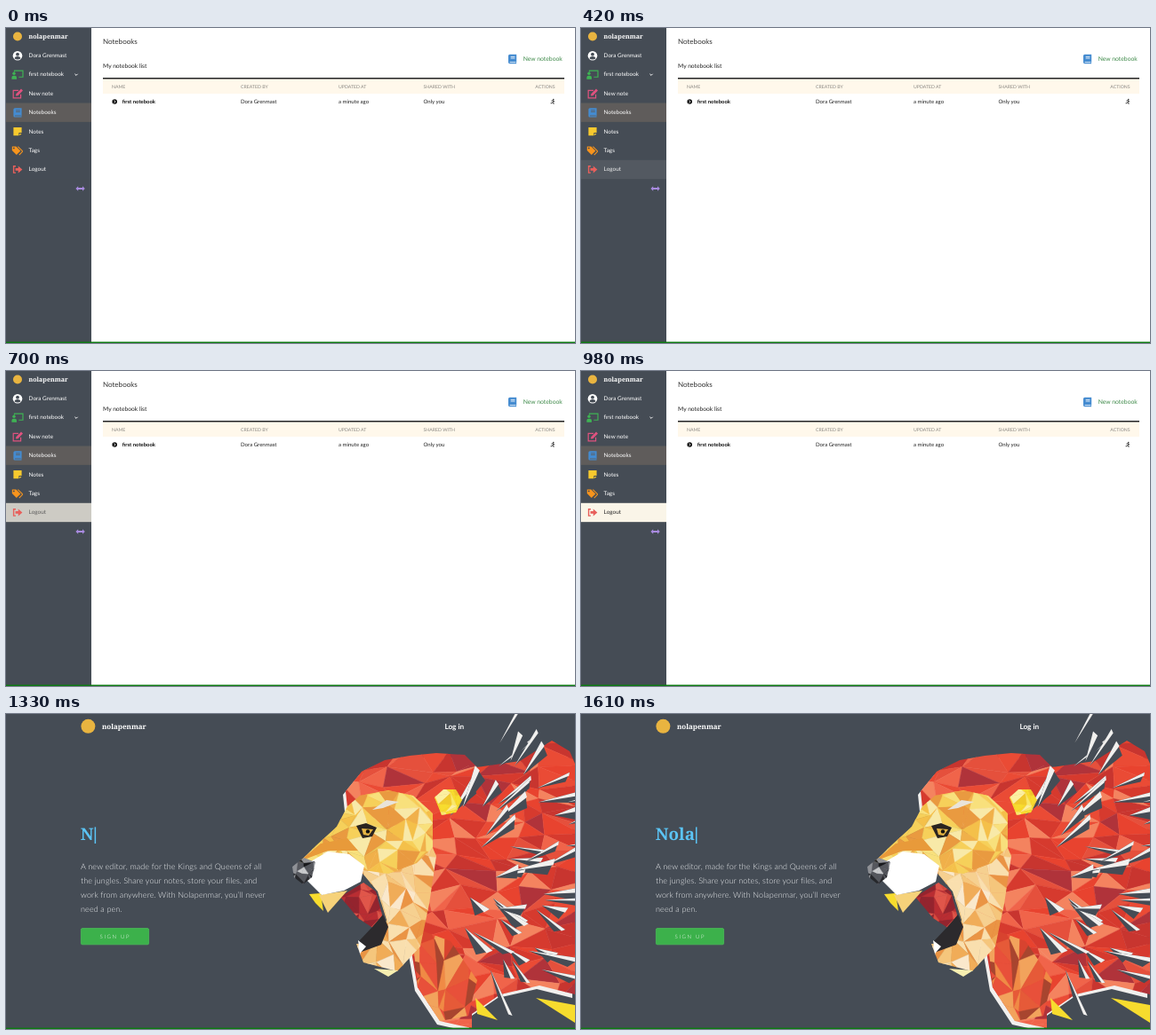
Recreate the animation shown at these times as an HTML page. Size 640x355 px, loop 1.68 s.

```html
<!DOCTYPE html>
<html lang="en">
<head>
<meta charset="utf-8">
<title>Notebooks</title>
<style>
  html, body { margin: 0; width: 100%; height: 100%; overflow: hidden; background: #fff; }
  svg { display: block; width: 640px; height: 355px; }
  text { font-family: Lato, "Open Sans", sans-serif; text-rendering: geometricPrecision; white-space: pre; }
  .slab { font-family: "Noto Serif", serif; }
</style>
</head>
<body>
<svg id="stage" viewBox="0 0 640 355"></svg>
<script>
const LOOP = 1680, TICK = 70, SWAP = 1330;
const SLATE = '#454c55', CREAM = '#fffaec', BLUE = '#448bd0', SKY = '#5bc4f5', GOLD = '#e9b440';
const BRAND = 'nolapenmar', USER = 'Dora Grenmast';
const stage = document.getElementById('stage');

function el(parent, tag, attrs = {}) {
  const node = document.createElementNS('http://www.w3.org/2000/svg', tag);
  for (const key in attrs) node.setAttribute(key, attrs[key]);
  parent.append(node);
  return node;
}
const rect = (p, x, y, width, height, fill, more) => el(p, 'rect', { x, y, width, height, fill, ...more });
const dot = (p, cx, cy, r, fill) => el(p, 'circle', { cx, cy, r, fill });
const shape = (p, points, fill, more) => el(p, 'polygon', { points, fill, ...more });
const solid = (p, d, fill) => el(p, 'path', { d, fill });
const line = (p, d, stroke, width) => el(p, 'path', { d, stroke, fill: 'none', 'stroke-width': width });
const at = (p, x, y) => el(p, 'g', { transform: `translate(${x} ${y})` });
function label(p, x, y, str, size, fill, more) {
  const node = el(p, 'text', { x, y, fill, 'font-size': size, ...more });
  node.textContent = str;
  return node;
}

const app = el(stage, 'g');
const hero = el(stage, 'g');

// ---- Icons, each drawn around its own centre ----
function book(g, paper) {
  solid(g, 'M-3-5.2H4.6V3.2Q4.1 4 4.6 5.2H-3Q-4.6 5.2-4.6 3.6V-3.6Q-4.6-5.2-3-5.2Z', BLUE);
  line(g, 'M-1.9-2.6H2.8M-1.9-.9H2.8M-3 3.6H3.8', paper, .8);
}
const icons = {
  user(g) {
    dot(g, 0, 0, 5.3, '#fff');
    dot(g, 0, -1.6, 1.9, SLATE);
    solid(g, 'M-3.4 3.2Q-3 .8 0 .8Q3 .8 3.4 3.2Q0 5.4-3.4 3.2Z', SLATE);
  },
  teacher(g) {
    line(g, 'M-3.5-3.2V-4.6H6V2.6H1.4', '#3fb354', 1.2);
    dot(g, -4, -1.4, 1.7, '#3fb354');
    solid(g, 'M-6.6 5V3.2Q-6.6 1-4.4 1H-3Q-1 1-1 3.2V5Z', '#3fb354');
  },
  edit(g) {
    line(g, 'M1-3.6H-4.8V4.9H3.6V.8', '#e0527f', 1.2);
    solid(g, 'M-2 2.6L-1.6.2L4-5.4L6-3.4L.4 2.2Z', '#e0527f');
  },
  book(g) { book(g, '#5f5c5b'); },
  sticky(g) { solid(g, 'M-4.6-4.6H4.6V1.4H1.4V4.6H-4.6ZM2.2 4.6V2.2H4.6Z', '#f8c92e'); },
  tags(g) {
    solid(g, 'M-6.2-4.6H-1.6L3.4.4L-1.2 5L-6.2 0Z', '#f7941d');
    line(g, 'M.4-4.4L5.2.4Q5.8 1 5.2 1.6L1.8 5', '#f7941d', 1.1);
    dot(g, -4.2, -2.6, .9, SLATE);
  },
  leave(g) {
    line(g, 'M-2-3.7H-4.4V3.7H-2', '#e8605c', 1.4);
    solid(g, 'M-2.4-1.4H.8V-4L5.4 0L.8 4V1.4H-2.4Z', '#e8605c');
  }
};

// ---- Notebook list ----
const ROW = 21.35;
rect(app, 0, 0, 640, 355, '#fff');
rect(app, 0, 0, 96, 355, SLATE);
rect(app, 0, 84.5, 96, ROW, '#5f5c5b');
const logoutRow = rect(app, 0, 148.8, 96, ROW, SLATE);
dot(app, 13, 9.5, 5, GOLD);
label(app, 25.5, 12, BRAND, 7.1, '#fff', { class: 'slab', 'font-weight': 700 });

const menu = {
  user: USER, teacher: 'first notebook', edit: 'New note', book: 'Notebooks',
  sticky: 'Notes', tags: 'Tags', leave: 'Logout'
};
const menuText = Object.entries(menu).map(([icon, str], i) => {
  const y = 31 + i * ROW;
  icons[icon](at(app, 13, y + .3));
  return label(app, 25.6, y + 2.1, str, 6.4, '#fff');
});
const logoutText = menuText.at(-1);
line(app, 'M77.4 51.8L79 53.4L80.6 51.8', '#fff', 1);
solid(at(app, 83.6, 181), 'M-5.2 0L-2.4-2.8V-.9H2.4V-2.8L5.2 0L2.4 2.8V.9H-2.4V2.8Z', '#a98be0');

label(app, 109, 18, 'Notebooks', 8.05, '#333');
label(app, 109, 44.9, 'My notebook list', 6.7, '#222');
book(at(app, 569.6, 35), '#fff');
label(app, 581.7, 37.3, 'New notebook', 6.8, '#3f8a4a');
rect(app, 109, 57.4, 519, 16.7, '#fff8eb');
rect(app, 109, 56, 519, 1.5, '#222');

function column(x, title, value, anchor = 'start') {
  label(app, x, 67.6, title, 5.2, '#8b8984', { 'text-anchor': anchor });
  label(app, x, 85.1, value, 6.05, '#222');
}
column(119, 'NAME', '');
column(264, 'CREATED BY', USER);
column(374, 'UPDATED AT', 'a minute ago');
column(469.5, 'SHARED WITH', 'Only you');
column(617.6, 'ACTIONS', '', 'end');
dot(app, 122.2, 83, 2.8, '#111');
line(app, 'M121.6 81.5L123.1 83L121.6 84.5', '#fff', .8);
label(app, 130.8, 85.1, 'first notebook', 5.9, '#111', { 'font-weight': 700 });
const runner = at(app, 615, 82.9);
dot(runner, .8, -2.4, .7, '#111');
line(runner, 'M-1.6-.6L-.4-1.3L.8-1L-.2.8L1 1.6V3M-.2.8L-1 1.9H-2.4M.8-1L1.3 0H2.2', '#111', .8);

// ---- Landing page ----
rect(hero, 0, 0, 640, 355, SLATE);
dot(hero, 92.4, 13.8, 8, GOLD);
label(hero, 108, 16.8, BRAND, 8, '#fff', { class: 'slab', 'font-weight': 600 });
label(hero, 493.4, 17, 'Log in', 8.2, '#fff', { 'font-weight': 700 });
const typed = label(hero, 83.8, 142.4, '', 18.8, SKY, { class: 'slab', 'font-weight': 600 });
const caret = rect(hero, 0, 127.4, 1.5, 18.6, SKY);
[
  'A new editor, made for the Kings and Queens of all',
  'the jungles. Share your notes, store your files, and',
  'work from anywhere. With Nolapenmar, you’ll never',
  'need a pen.'
].forEach((str, i) => label(hero, 84, 175.4 + i * 15.95, str, 9, '#eceef0',
  { 'font-weight': 300, 'letter-spacing': .12 }));
rect(hero, 84.4, 241.6, 76.2, 18.2, '#3cb14b', { rx: 1.5, stroke: '#4bbb59', 'stroke-width': .8 });
label(hero, 105.6, 252.9, 'SIGN UP', 6, '#fff', { 'letter-spacing': 1.6, 'font-weight': 300 });

// ---- Low-poly lion ----
const REDS = ['#e8432f', '#ea4b35', '#d63a2e', '#c8352f', '#f0644a', '#b0333a', '#e5503c', '#f4835f'];
const EMBERS = ['#e65a38', '#f08a45', '#d8432f', '#f2a35c', '#a8452f', '#e8503a'];
const GOLDS = ['#f6d05a', '#f8e07c', '#f0b04a', '#f4c04a', '#e99a40', '#f8e9a8'];
const TANS = ['#f5c67c', '#f9dfae', '#f0ac58', '#f6d090', '#fae8cc', '#ea9444'];
const LEMONS = ['#f7dc2e', '#f9e96a', '#f0c92c', '#fbf0a0'];
const CRIMSONS = ['#b92d32', '#d84a3e', '#94242e', '#e0564a'];
const GREYS = ['#26272b', '#55575d', '#8f9196', '#18191c', '#c9cacc'];

function seeded(seed) {
  return () => (seed = (seed * 16807) % 2147483647) / 2147483647;
}
const pick = (list, rnd) => list[Math.floor(rnd() * list.length)];

// Fills an outline with jittered triangles.
let clips = 0;
function facets(outline, w, h, palette) {
  const id = 'clip' + ++clips, rnd = seeded(clips * 7919);
  const clip = shape(el(hero, 'clipPath', { id }), outline);
  const g = el(hero, 'g', { 'clip-path': `url(#${id})` });
  const box = clip.getBBox();
  const cols = Math.ceil(box.width / w) + 2, rows = Math.ceil(box.height / h) + 2;
  const grid = Array.from({ length: rows }, (_, j) => Array.from({ length: cols }, (_, i) =>
    [box.x + (i - 1 + rnd() * .8) * w, box.y + (j - 1 + rnd() * .8) * h]));
  const tri = (...corners) => {
    const fill = pick(palette, rnd);
    shape(g, corners.join(' '), fill, { stroke: fill, 'stroke-width': .5 });
  };
  for (let j = 1; j < rows; j++) for (let i = 1; i < cols; i++) {
    const a = grid[j - 1][i - 1], b = grid[j - 1][i], c = grid[j][i - 1], d = grid[j][i];
    if (rnd() < .5) { tri(a, b, c); tri(b, d, c); }
    else { tri(a, b, d); tri(a, d, c); }
  }
}

// Thin gaps with pale edges that fan out through the mane.
function slivers(count) {
  const rnd = seeded(4711);
  for (let i = 0; i < count; i++) {
    const angle = -1.05 + 2.05 * i / count, reach = 65 + rnd() * 120;
    const g = el(hero, 'g', {
      transform: `translate(${465 + Math.cos(angle) * reach} ${175 + Math.sin(angle) * reach})
        rotate(${angle * 57.3 + rnd() * 50 - 25})`
    });
    const len = 24 + rnd() * 36, wide = 4 + rnd() * 5;
    shape(g, `0,0 ${len},${-wide} ${len * .8},${wide}`, SLATE);
    shape(g, `0,0 ${len},${-wide} ${len * .95},${-wide * .2}`, '#f1f0ee');
  }
}

const mane = '384,106 382,87 400,65 426,52 454,47 484,44 516,46 530,60 578,53 614,30 634,42 640,56 '
  + '640,316 600,306 556,316 524,338 524,354 488,346 463,308 456,268 430,200 450,130';
shape(hero, mane, '#f1f0ee', { transform: 'translate(-3 4)' });
facets(mane, 36, 20, REDS);
facets('456,240 500,256 530,300 520,340 488,346 463,308', 18, 26, EMBERS);
slivers(46);
shape(hero, '528,320 553,345 530,338', LEMONS[0]);
shape(hero, '596,320 640,328 640,348', LEMONS[0]);

facets('398,176 440,130 470,128 484,160 476,214 466,262 440,290 402,280 394,259 420,258 428,232 418,200', 16, 20, TANS);
facets('384,104 398,92 430,86 458,92 480,112 480,150 462,168 430,180 402,176 384,160 328,169 349,148 372,127', 18, 16, GOLDS);
facets('482,94 492,85 506,85 513,97 506,111 490,114', 11, 11, LEMONS);
shape(hero, '412,108 428,97 442,99 424,106', '#e9e4da');
shape(hero, '330,166 354,146 384,140 396,154 362,154', '#e89a3a');

// Mouth, teeth, muzzle, nose and eye
facets('376,206 402,190 416,200 424,230 414,242 396,230', 13, 13, CRIMSONS);
shape(hero, '424,226 430,240 422,260 400,268 396,257 412,240', '#2c2a2d');
shape(hero, '396,255 405,262 398,270', '#fff');
shape(hero, '414,287 441,289 430,296', '#f6eeb0');
shape(hero, '341,203 354,202 357,222 348,213', LEMONS[0]);
shape(hero, '352,204 384,199 362,224', '#f6d27a');
shape(hero, '343,166 362,155 386,158 403,171 399,189 380,199 355,204 337,186', '#fff');
facets('322,172 335,162 348,167 344,184 334,192 324,184', 9, 9, GREYS);
shape(hero, '394,126 405,123 417,128 412,138 401,140', '#2a2420');
shape(hero, '400,129 413,130 408,137 402,136', '#e5b544');
dot(hero, 407, 132.4, 2.2, '#15120f');

rect(stage, 0, 353.6, 640, 1.4, '#0b7a10');

// ---- Timeline ----
const fade = { delay: 350, duration: 800, easing: 'ease', fill: 'both' };
const hover = [
  logoutRow.animate({ fill: [SLATE, CREAM] }, fade),
  logoutText.animate({ fill: ['#fff', '#222'] }, fade)
];
hover.forEach(a => a.pause());

function draw(time) {
  const t = Math.floor(time % LOOP / TICK) * TICK;
  const landing = t >= SWAP;
  app.style.display = landing ? 'none' : '';
  hero.style.display = landing ? '' : 'none';
  hover.forEach(a => { a.currentTime = t; });
  if (landing) {
    typed.textContent = 'Nolapenmar'.slice(0, 1 + Math.round((t - SWAP) / 94));
    caret.setAttribute('x', 84.8 + typed.getComputedTextLength());
  }
}

const start = performance.now();
function frame() {
  draw(performance.now() - start);
  requestAnimationFrame(frame);
}
frame();
</script>
</body>
</html>
```
